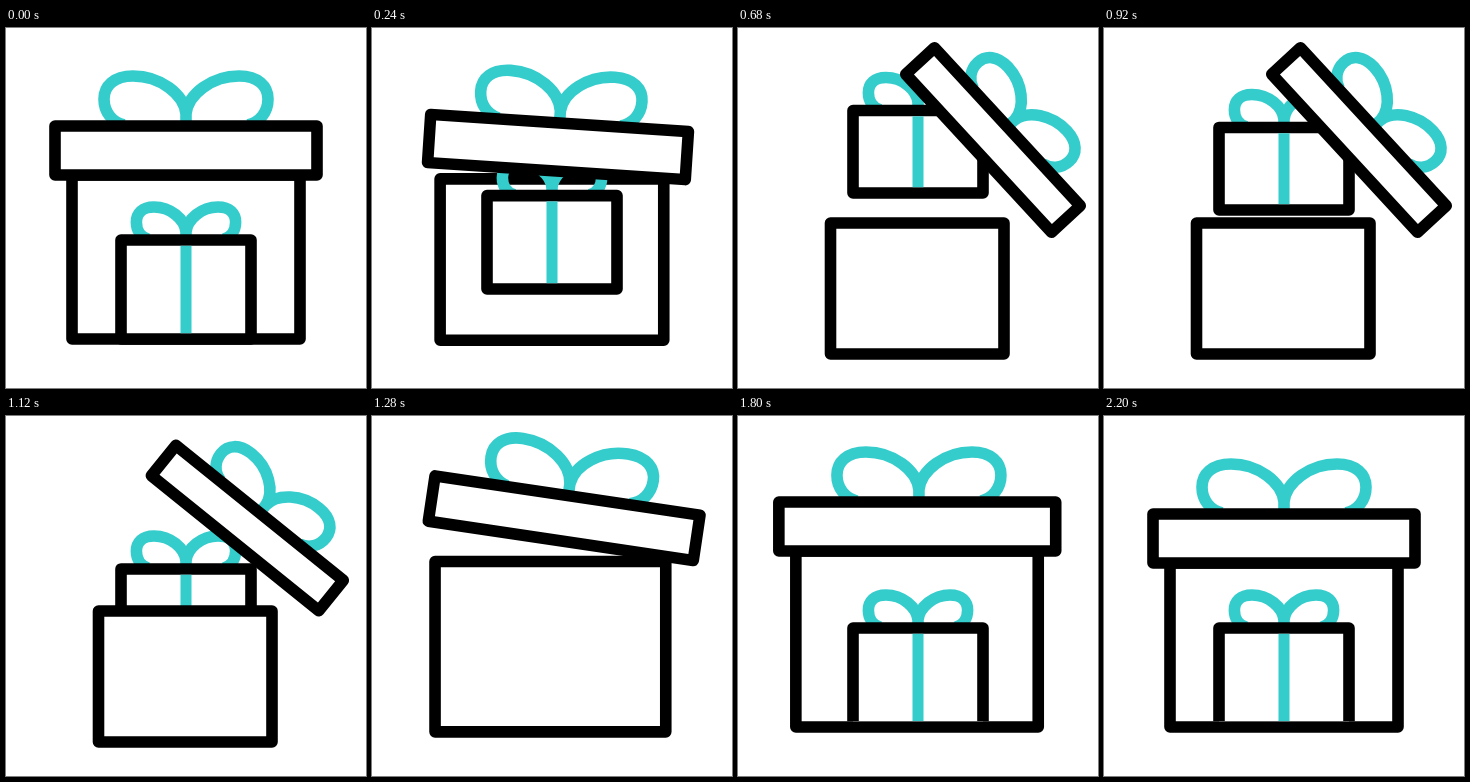
Write an HTML page with a canvas that moves like this. It is 360 px wide and 360 px high and loops after 2.4 s.

```html
<!DOCTYPE html>
<html lang="en">
<head>
<meta charset="utf-8">
<title>Gift box</title>
<style>
  html, body { margin: 0; width: 100%; height: 100%; overflow: hidden; background: #fff; }
  canvas { display: block; width: 360px; height: 360px; }
</style>
</head>
<body>
<canvas id="stage"></canvas>
<script>
const LOOP = 2400, STEP = 40, LINE = 11.6;
const INK = '#000', TEAL = '#35cccc';
const OPENED = 680, LANDED = 1280, WIDE = 1480;

// The three poses: closed, lid off, and stretched after closing.
const REST = {
  box: { left: 66, top: 147, right: 294, bottom: 311 },
  lid: { x: 180, y: 122.5, w: 262, h: 49, deg: 0 }
};
const OPEN = {
  box: { left: 92.5, top: 195, right: 266, bottom: 326 },
  lid: { x: 255, y: 112, w: 215, h: 39, deg: 47.3 }
};
const STRETCH = {
  box: { left: 49, top: 122, right: 307, bottom: 311 },
  lid: { x: 178.5, y: 97.5, w: 293, h: 49, deg: 0 }
};

const span = (t, from, to) => Math.min(1, Math.max(0, (t - from) / (to - from)));
const smooth = u => (1 - Math.cos(Math.PI * u)) / 2;
const easeOut = (u, k) => 1 - (1 - u) ** k;
const lerp = (a, b, p) => a + (b - a) * p;
const mix = (a, b, p) =>
  Object.fromEntries(Object.keys(a).map(key => [key, lerp(a[key], b[key], p)]));

function pose(t) {
  if (t < OPENED) {
    const p = span(t, 120, OPENED) ** 1.64;
    const lid = mix(REST.lid, OPEN.lid, p);
    lid.y -= 36 * p * (1 - p); // lifts in an arc
    return { box: mix(REST.box, OPEN.box, p), lid };
  }
  if (t < WIDE) {
    const grow = smooth(span(t, 1120, 1380));
    const swing = smooth(span(t, 1020, 1380));
    const { x, deg } = mix(OPEN.lid, STRETCH.lid, swing);
    return {
      box: mix(OPEN.box, STRETCH.box, grow),
      lid: { ...mix(OPEN.lid, STRETCH.lid, grow), x, deg }
    };
  }
  const p = easeOut(span(t, WIDE, 2200), 1.25);
  return { box: mix(STRETCH.box, REST.box, p), lid: mix(STRETCH.lid, REST.lid, p) };
}

// Top and bottom of the small gift: jumps out, drops back, slides up anew.
function innerSpan(t) {
  if (t < OPENED) {
    const p = easeOut(span(t, 120, OPENED), 1.74);
    return [lerp(212, 82.5, p), lerp(311, 165, p)];
  }
  if (t < LANDED) {
    const drop = 146 * span(t, OPENED, LANDED) ** 2.35;
    return [82.5 + drop, 165 + drop];
  }
  const top = lerp(350, 212, easeOut(span(t, LANDED, 1760), 5.5));
  return [top, top + 99];
}

const canvas = document.getElementById('stage');
const ctx = canvas.getContext('2d');
const ratio = window.devicePixelRatio || 1;
canvas.width = canvas.height = 360 * ratio;

function panel(x, y, w, h) {
  ctx.fillStyle = '#fff';
  ctx.fillRect(x, y, w, h);
  ctx.strokeStyle = INK;
  ctx.strokeRect(x, y, w, h);
}

// Two mirrored loops standing on (x, y).
function bow(x, y, sx, sy) {
  ctx.beginPath();
  for (const side of [-1, 1]) {
    const px = v => x + side * v * sx, py = v => y - v * sy;
    const curve = (a, b, c, d, e, f) =>
      ctx.bezierCurveTo(px(a), py(b), px(c), py(d), px(e), py(f));
    ctx.moveTo(px(0), py(0));
    ctx.lineTo(px(0), py(12));
    curve(2, 32, 26, 50, 53, 50);
    curve(72, 50, 82, 40, 82, 27);
    curve(82, 14, 74, 4, 62, 1);
  }
  ctx.strokeStyle = TEAL;
  ctx.stroke();
}

function drawInner(t) {
  const [top, bottom] = innerSpan(t);
  bow(180, top, 0.605, 0.66);
  panel(115, top, 130, bottom - top);
  ctx.fillStyle = TEAL;
  ctx.fillRect(174.5, top + LINE / 2, 11, bottom - top - LINE);
}

function drawLid({ x, y, w, h, deg }) {
  ctx.save();
  ctx.translate(x, y);
  ctx.rotate(deg * Math.PI / 180);
  const s = Math.min(1, w / 262);
  bow(Math.max(0, w - 262) / 9, -h / 2, s, s);
  panel(-w / 2, -h / 2, w, h);
  ctx.restore();
}

function draw(t) {
  ctx.setTransform(ratio, 0, 0, ratio, 0, 0);
  ctx.fillStyle = '#fff';
  ctx.fillRect(0, 0, 360, 360);
  ctx.lineWidth = LINE;
  ctx.lineJoin = 'round';

  const { box, lid } = pose(t);
  const falling = t >= OPENED && t < LANDED;
  if (falling) drawInner(t);
  panel(box.left, box.top, box.right - box.left, box.bottom - box.top);
  if (!falling) {
    ctx.save();
    if (t >= LANDED) {
      // stay above the floor of the box
      ctx.beginPath();
      ctx.rect(0, 0, 360, box.bottom - LINE / 2);
      ctx.clip();
    }
    drawInner(t);
    ctx.restore();
  }
  drawLid(lid);
}

const start = performance.now();
function tick() {
  const t = (performance.now() - start) % LOOP;
  draw(Math.floor(t / STEP) * STEP);
  requestAnimationFrame(tick);
}
tick();
</script>
</body>
</html>
```
